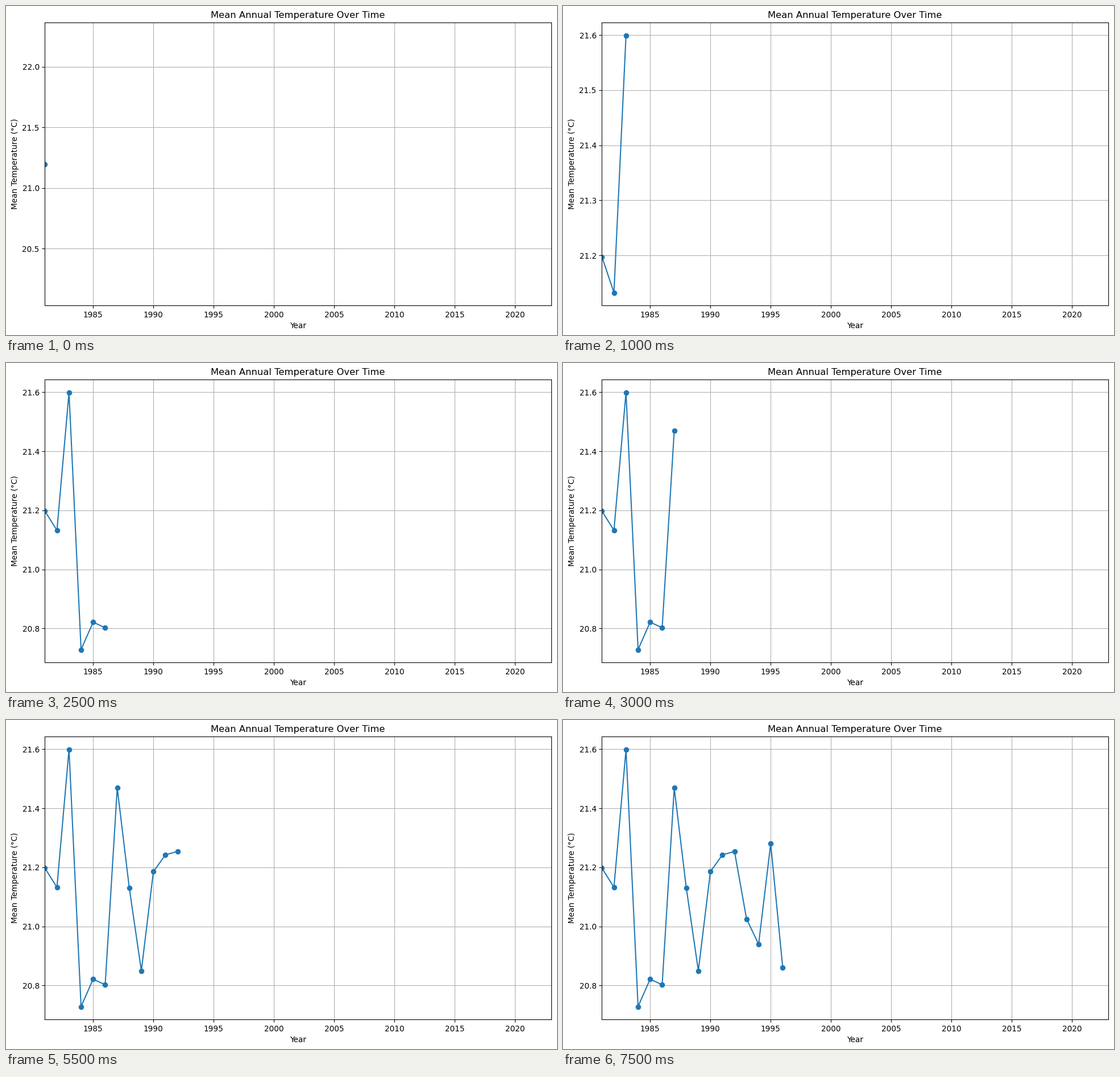
A matplotlib script that plays this animation: 969x578 px, repeating every 8000 ms.

```python
import matplotlib.pyplot as plt
from matplotlib.animation import FuncAnimation

W, H, DPI = 969, 578, 98
TOP, BOTTOM, RIGHT = 29.1, 526.1, 958.9
LEFT, DIGIT = 68.4, 8.66  # left edge, and its shift for one more label digit

FIRST, LAST = 1981, 2023
TEMPS = [21.1975, 21.1325, 21.5995, 20.7283, 20.8212, 20.8023, 21.469, 21.1304,
         20.8496, 21.1855, 21.2426, 21.2538, 21.025, 20.9396, 21.28, 20.86]

fig = plt.figure(figsize=((W + 1e-4) / DPI, (H + 1e-4) / DPI), dpi=DPI)
ax = fig.add_axes([0, 0, 1, 1])
line, = ax.plot([], [], marker="o")
ax.set_title("Mean Annual Temperature Over Time")
ax.set_xlabel("Year")
ax.set_ylabel("Mean Temperature (°C)")
ax.grid(True)


def place_axes(left):
    ax.set_position([left / W, 1 - BOTTOM / H,
                     (RIGHT - left) / W, (BOTTOM - TOP) / H])


def update(i):
    n = i + 1
    line.set_data(range(FIRST, FIRST + n), TEMPS[:n])
    ax.relim()
    ax.autoscale(True, axis="y")
    ax.autoscale_view(scalex=False)
    ax.set_xlim(FIRST, LAST)
    # the two-point range is narrow enough to need two decimals
    place_axes(LEFT + DIGIT * (n == 2))
    return line,


anim = FuncAnimation(fig, update, frames=len(TEMPS), interval=500,
                     init_func=lambda: update(0), repeat=True,
                     repeat_delay=0, blit=False)
plt.show()
```
